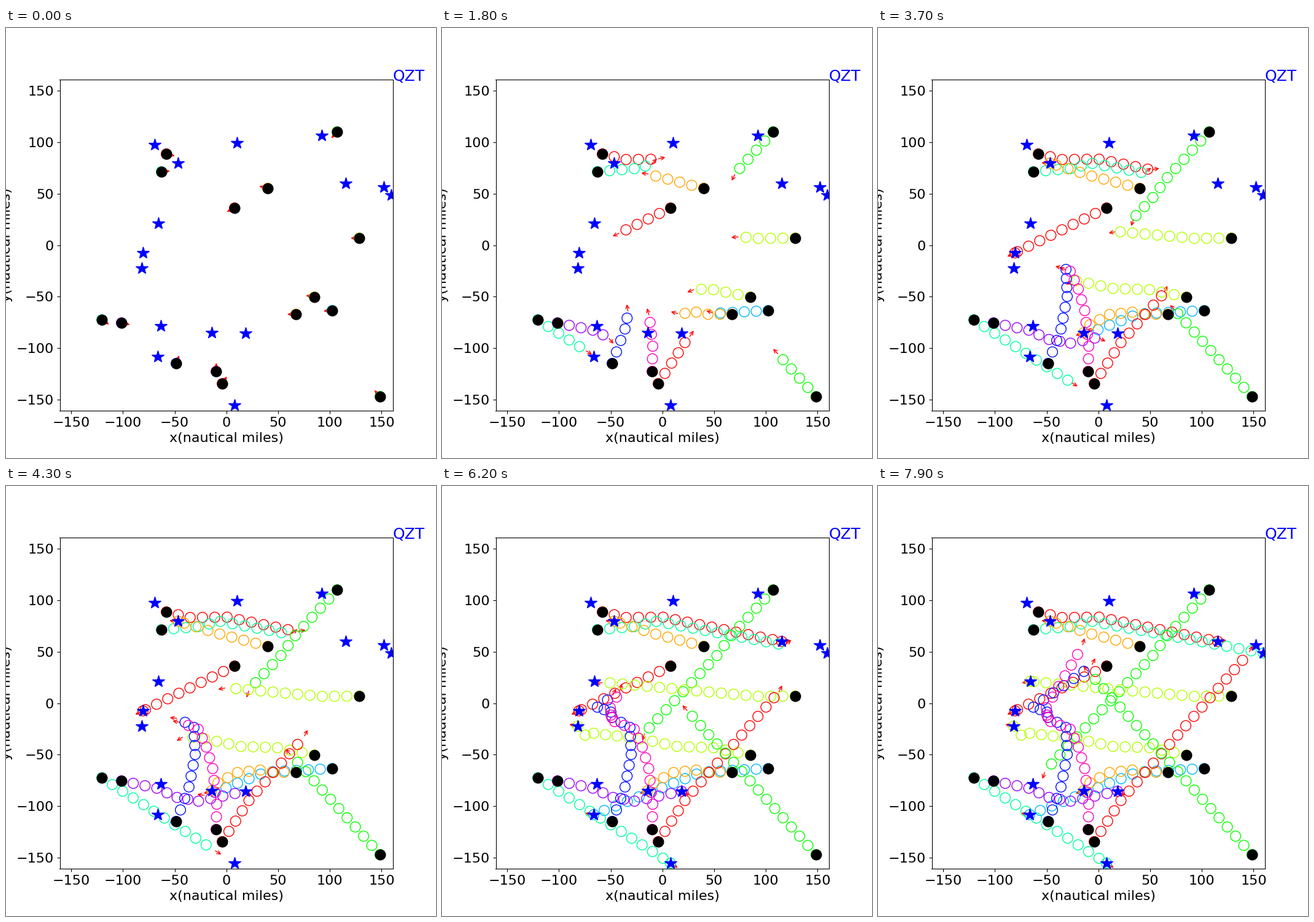
A matplotlib script for the animation above (8000 ms loop, 700 by 700 pixels).

```python
import numpy as np
import matplotlib.pyplot as plt
from matplotlib.animation import FuncAnimation

FRAMES, STEP = 80, 4         # a ring is left behind every STEP frames
LIMIT = 161                  # half width of the sector, nautical miles
PACE = 12                    # miles flown per step
ARROW = 10                   # arrow length in miles
TURN_IN = 28                 # frames until the full drift angle is held

plt.rcParams.update({"font.size": 16, "font.family": "DejaVu Sans"})
fig, ax = plt.subplots(figsize=(7, 7), dpi=100)
ax.set(xlim=(-LIMIT, LIMIT), ylim=(-LIMIT, LIMIT),
       xlabel="x(nautical miles)", ylabel="y(nautical miles)")
hues = plt.get_cmap("hsv")
RED, ORANGE, LIME, GREEN, TEAL, SKY, BLUE, PURPLE, PINK = (
    hues(i / 9) for i in range(9))


class Plane:
    """Flies at a steady pace over its turning points to a star."""

    def __init__(self, color, drift, *route):
        self.x, self.y = np.transpose(route)
        legs = np.hypot(np.diff(self.x), np.diff(self.y)) / PACE
        legs[:-1] = np.ceil(legs[:-1] - 0.1)   # turns fall on whole steps
        self.t = np.append(0, np.cumsum(legs)) * STEP
        self.end = self.t[-1]
        self.drift = np.radians(drift)

        ax.plot(*route[0], "ko", ms=12, mew=1, zorder=2.2)
        ax.plot(*route[-1], "b*", ms=15, mew=1, zorder=2.3)
        self.rings = ax.scatter([], [], s=144, facecolors="none",
                                edgecolors=[color], lw=1, zorder=2.1)
        self.arrow = ax.annotate(
            "", xy=(0, 0), xytext=(0, 0), zorder=2,
            arrowprops=dict(arrowstyle="->", color="red", lw=1,
                            mutation_scale=10, shrinkA=2, shrinkB=2))

    def at(self, t):
        return np.array([np.interp(t, self.t, self.x),
                         np.interp(t, self.t, self.y)])

    def heading(self, t):
        dx, dy = self.at(t + 2) - self.at(t - 2)
        return np.arctan2(dy, dx) + self.drift * min(1, t / TURN_IN)

    def update(self, frame):
        last = min(frame, np.ceil(self.end / STEP) * STEP)
        self.rings.set_offsets(self.at(np.arange(0, last + 1, STEP)).T)
        t = min(frame, self.end)
        x, y = self.at(t)
        a = self.heading(t)
        self.arrow.set_position((x, y))
        self.arrow.xy = (x + ARROW * np.cos(a), y + ARROW * np.sin(a))


planes = [
    Plane(RED, 21, (-58, 88.7), (-35, 83.3), (0.7, 83.6), (115.3, 60)),
    Plane(TEAL, 48, (-62.8, 71.4), (-27.2, 74.4), (-5.8, 79.5),
          (159.2, 48.7)),
    Plane(ORANGE, 14, (39.9, 55.3), (-6.4, 67.2), (-46.7, 79.7)),
    Plane(RED, 0, (7.9, 36.1), (-80.6, -7.5)),
    Plane(GREEN, 25, (107, 110.2), (66.6, 65.7), (52.7, 46.3),
          (-63.4, -78.6)),
    Plane(LIME, 16, (128.4, 6.9), (92.7, 6.6), (33.1, 11.9), (-65.7, 21.2)),
    Plane(LIME, 38, (85, -50.5), (49.4, -43.3), (14.1, -42.1),
          (-21.2, -34.6), (-66.3, -29.3), (-74.6, -31.1), (-81.8, -22.4)),
    Plane(SKY, -32, (102.2, -63.6), (44.7, -66.6), (33.1, -69),
          (-66.3, -108.4)),
    Plane(ORANGE, -33, (67.2, -67.2), (44.1, -67.2), (32.8, -65.1),
          (10.8, -67.5), (-8.2, -77.4), (-14.1, -85.1)),
    Plane(TEAL, 0, (-120.3, -72.6), (7.9, -155.6)),
    Plane(PURPLE, -40, (-101.4, -75.6), (-67.2, -82.7), (-47.6, -91.7),
          (-26.9, -95.3), (18.5, -85.7)),
    Plane(BLUE, 30, (-48.5, -115), (-36.1, -81.5), (-30.1, -49.9),
          (-31.3, -23.6), (-48.5, -13.7), (-49.7, -8.7), (-62.8, -3.9),
          (92.1, 106.6)),
    Plane(PINK, 15, (-9.9, -122.8), (-9.3, -98.3), (-13.2, -63.6),
          (-19.4, -42.7), (-27.2, -25.4), (-46.1, -17.9), (-48.8, -14),
          (-49.7, -11.6), (-50.3, -4.5), (10.2, 99.5)),
    Plane(RED, 13, (-4, -134.7), (21.8, -94.7), (152.1, 56.5)),
    Plane(GREEN, 0, (148.5, -147.3), (-69.3, 97.7)),
]
ax.text(160.5, 160, "QZT", color="blue", fontsize=18)


def update(frame):
    for plane in planes:
        plane.update(frame)
    return []


anim = FuncAnimation(fig, update, frames=FRAMES, interval=100,
                     repeat=True, repeat_delay=0, blit=False)
plt.show()
```
